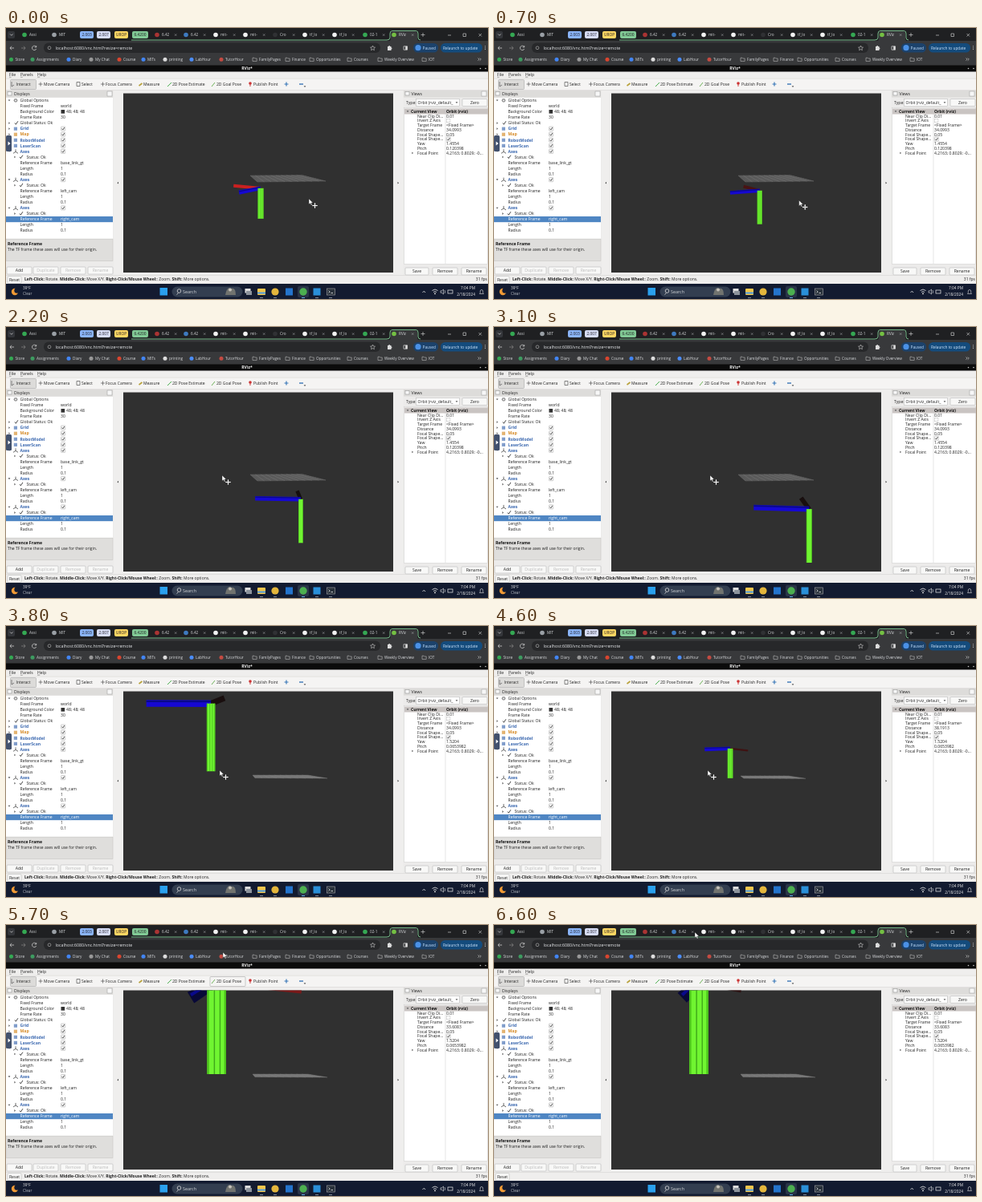
Recreate the animation shown at these times as an HTML page. Size 600x338 px, loop 6700 ms.

```html
<!DOCTYPE html>
<html lang="en">
<head>
<meta charset="utf-8">
<title>RViz axes view</title>
<style>
html, body { margin: 0; width: 100%; height: 100%; overflow: hidden; background: #202124; }
svg { display: block; width: 100vw; height: 100vh; }
text { font-family: "Open Sans", "Noto Sans", sans-serif; white-space: pre; }
</style>
</head>
<body>
<svg id="stage" viewBox="0 0 600 338" preserveAspectRatio="none"></svg>
<script>
const LOOP = 6700, STEP = 100;
const stage = document.getElementById('stage');

// Markup helpers
const rect = (x, y, w, h, fill, extra = '') => `<rect x="${x}" y="${y}" width="${w}" height="${h}" fill="${fill}" ${extra}/>`;
const disc = (x, y, r, fill) => `<circle cx="${x}" cy="${y}" r="${r}" fill="${fill}"/>`;
const path = (d, stroke, width = 0.7, fill = 'none') => `<path d="${d}" stroke="${stroke}" stroke-width="${width}" fill="${fill}"/>`;
const label = (x, y, s, fill = '#222', size = 5.1, extra = '') => `<text x="${x}" y="${y}" font-size="${size}" fill="${fill}" ${extra}>${s}</text>`;
const BOLD = 'font-weight="700"', MIDDLE = 'text-anchor="middle"', END = 'text-anchor="end"';
const line = (a, b, stroke, width) =>
  `<line x1="${a[0]}" y1="${a[1]}" x2="${b[0]}" y2="${b[1]}" stroke="${stroke}" stroke-width="${width}"/>`;
const check = (x, y) => rect(x, y - 2.6, 5.2, 5.2, '#f4f4f4', 'stroke="#aaa" stroke-width=".5" rx=".6"') +
  path(`M${x + 1} ${y}l1.3 1.4 2-3`, '#333', 0.8);
const button = (x, y, w, s, fill = '#222') =>
  rect(x, y, w, 9, '#f8f8f7', 'stroke="#bbb" stroke-width=".6" rx="1"') + label(x + w / 2, y + 6.4, s, fill, 5.1, MIDDLE);
const arrow = (x, y, open) => path(open ? `M${x - 1.4} ${y - .8}h2.8l-1.4 1.8z` : `M${x - .6} ${y - 1.4}l1.6 1.4-1.6 1.4z`, 'none', 0, '#555');

function browser() {
  let s = rect(0, 0, 600, 17, '#1f2022') + rect(0, 16, 600, 31, '#38393b');
  s += rect(2, 4, 9, 9, '#34363a', 'rx="2"') + path('M5 7.5l1.8 1.8 1.8-1.8', '#ddd');
  s += path('M156 15H474q4 0 4-3V7q0-3.5 3-3.5h29q3 0 3 3.5v5q0 3 3 3', '#81c995', 0.9) +
    path('M476 17q3-1 3-4V7q0-3 3-3h27q3 0 3 3v6q0 3 3 4z', 'none', 0, '#38393b');
  const tabs = [[29, 'Assi', '#34a853'], [66, 'MIT', '#9aa0a6'], [194, '6.42', '#a33'], [230, '6.42', '#3e7ac0'],
    [267, 'mit-', '#f2f2f2'], [304, 'mit-', '#f2f2f2'], [341, 'Cro', '#303134'], [378, 'tf_lo', '#f2f2f2'],
    [415, 'tf_lo', '#f2f2f2'], [453, '02-1', '#35a853'], [489, 'RViz', '#74c043']];
  for (const [x, name, color] of tabs) {
    s += disc(x - 6, 8.5, 2.8, color) + label(x, 10.3, name, '#d8dadd', 4.7);
    if (x > 100) s += path(`M${x + 16} 7.4l2.4 2.4m0-2.4l-2.4 2.4`, '#b5b7ba', 0.5);
  }
  const chips = [[92, 17, '2.003', '#8ab4f8'], [113, 17, '2.007', '#d6dcf5'], [135, 17, 'UROP', '#fdd663'], [157, 20, '6.4200', '#81c995']];
  for (const [x, w, name, color] of chips)
    s += rect(x, 4, w, 9, color, 'rx="2"') + label(x + w / 2, 10.4, name, '#202124', 4.8, MIDDLE);
  s += path('M519 6v5m-2.5-2.5h5M550 9h4M569 7h3.5v3.5H569zM588.5 7l3.5 3.5m0-3.5l-3.5 3.5', '#ddd', 0.6);

  s += path('M10 25H5m2-2.3L5 25l2 2.3', '#ddd') + path('M19 25h5m-2-2.3l2 2.3-2 2.3', '#888') +
    path('M37.5 23.5a2.7 2.7 0 1 0 .2 2.5m0-4v2h-2', '#ddd');
  s += rect(47, 18.5, 419, 12.5, '#27282a', 'rx="6"') + `<circle cx="54" cy="24.8" r="1.9" fill="none" stroke="#aaa" stroke-width=".7"/>`;
  s += label(61.5, 26.6, 'localhost:6080/vnc.html?resize=remote', '#e8eaed', 5.25);
  s += path('M456.5 22l.9 2 2.1.2-1.6 1.4.5 2.1-1.9-1.1-1.9 1.1.5-2.1-1.6-1.4 2.1-.2z', '#ccc', 0.6) +
    path('M475 23h1.2a1 1 0 0 1 2 0h1.3v1.5a1 1 0 0 1 0 2V28H475z', 'none', 0, '#ddd') + path('M495 22.8h4.5v4.4H495z', '#ddd', 0.7) + rect(497.2, 22.8, 2.3, 4.4, '#ddd');
  s += rect(507, 19, 31, 11.5, '#1c426b', 'rx="5.5"') + disc(513, 24.7, 3.6, '#4b91e6') + label(518.5, 26.5, 'Paused', '#c2e0ff', 4.8);
  s += rect(541, 19, 52, 11.5, '#144b7c', 'rx="5.5"') + label(544, 26.5, 'Relaunch to update', '#d2e8ff', 4.75);
  for (const y of [22.8, 24.7, 26.6]) s += disc(596.5, y, 0.5, '#ddd');

  const marks = [[11.5, 'Store', '#34a853'], [38, 'Assignments', '#3d9b60'], [83, 'Diary', '#4285f4'], [111, 'My Chat', '#999'],
    [146, 'Course', '#d9452f'], [176, 'MITs', '#4285f4'], [203, 'printing', '#ddd'], [236, 'LabHour', '#4b8df8'], [273, 'TutorHour', '#c44b42']];
  for (const [x, name, color] of marks) s += disc(x - 5, 39.2, 2.5, color) + label(x, 41, name, '#d8dadd', 4.7);
  for (const [x, name] of [[315, 'FamilyPages'], [356, 'Finance'], [386, 'Opportunities'], [433, 'Courses'], [471, 'Weekly Overview'], [526, 'IOT']])
    s += path(`M${x - 8} 37.2h2l.8.8h2.4v3.4h-5.2z`, '#bbb', 0.6) + label(x, 41, name, '#d8dadd', 4.7);
  s += path('M587.5 37.5l1.6 1.6-1.6 1.6m2.2-3.2l1.6 1.6-1.6 1.6', '#ddd', 0.6);
  return s;
}

function displays() {
  let s = rect(0, 78, 134, 230, '#ecebea') + rect(0, 78, 133, 8.5, '#dddcda') +
    rect(2, 79.5, 5, 4.5, '#f7f7f7', 'stroke="#888" stroke-width=".5"') + label(10, 84, 'Displays') +
    rect(126, 79, 6, 6, '#f7f7f7', 'stroke="#999" stroke-width=".5"');
  s += rect(0, 87, 133, 175.5, '#fff');
  const axes = frame => [[1, 'Axes', true, '#3c69b0'], [2, '✓ Status: Ok'], [2, 'Reference Frame', frame], [2, 'Length', '1'], [2, 'Radius', '0.1']];
  const rows = [[0, 'Global Options'], [2, 'Fixed Frame', 'world'], [2, 'Background Color', '48; 48; 48'], [2, 'Frame Rate', '30'],
    [0, '✓ Global Status: Ok'], [1, 'Grid', true, '#3c69b0'], [1, 'Map', true, '#d58a26'], [1, 'RobotModel', true, '#3c69b0'],
    [1, 'LaserScan', true, '#3c69b0'], ...axes('base_link_gt'), ...axes('left_cam'), ...axes('right_cam')];
  rows.forEach(([level, name, value, color], i) => {
    const y = 90.3 + 7.06 * i, base = y + 1.8, selected = i === 21;
    const ink = selected ? '#fff' : '#222';
    if (selected) s += rect(0, y - 3.6, 133, 7.2, '#4f86c3');
    const ok = name.startsWith('✓ ');
    if (level < 2) s += arrow(4, y, i === 0 || name === 'Axes');
    if (ok) {
      const x = level ? 16 : 10;
      s += path(`M${x + 1} ${y}l1.3 1.7 2.6-4`, '#333', 0.9);
      if (level) s += arrow(11, y, false);
      s += label(level ? 25.5 : 17.5, base, name.slice(2));
    } else if (level === 0) {
      s += disc(12, y, 2.4, '#999') + disc(12, y, 0.9, '#fff') + label(17.5, base, name);
    } else {
      s += label(17.5, base, name, color || ink, 5.1, color ? BOLD : '');
      if (level === 1) s += name === 'Axes' ? path(`M12 ${y - 2.5}v3l-3 2m3-2l3 2`, '#444', 0.8)
        : rect(9.8, y - 2, 4.2, 4.2, color, 'opacity=".65"');
    }
    if (value === true) s += check(68.5, y);
    else if (value) {
      if (i === 2) s += rect(68.5, y - 2.4, 4.6, 4.6, '#303030');
      s += label(i === 2 ? 75 : 68, base, value, ink);
    }
  });
  s += rect(0, 263.5, 133, 27, '#dfdedc', 'stroke="#c4c3c1" stroke-width=".5"') + label(2, 271.3, 'Reference Frame', '#111', 5.1, BOLD) +
    label(2, 277.8, 'The TF frame these axes will use for their origin.', '#222', 5);
  s += button(1, 298, 31, 'Add') + button(34, 298, 31, 'Duplicate', '#bbb') + button(68, 298, 31, 'Remove', '#bbb') + button(102, 298, 31, 'Rename', '#bbb');
  s += rect(0, 134, 7, 20, '#42516d', 'rx="1.5"') + path('M2.5 141.5l3 2.5-3 2.5z', 'none', 0, '#fff');
  return s;
}

function rviz() {
  let s = rect(0, 46.5, 600, 8, '#0b0b0b') + label(300, 52.4, 'RViz*', '#f2f2f2', 5.1, MIDDLE + ' ' + BOLD);
  s += disc(590.5, 50.5, 0.8, '#ccc') + disc(597, 50.5, 0.8, '#ccc');
  s += rect(0, 54.5, 600, 265, '#efeeed') + label(4, 60.4, 'File') + label(18, 60.4, 'Panels') + label(39, 60.4, 'Help');
  s += path('M4 61.2h2.5M18 61.2h2.8M39 61.2h3.3', '#222', 0.4);
  s += rect(0, 63, 600, 14.5, '#f5f4f3') + path('M0 63.2H600M0 77.5H600', '#d0cfcd', 0.5);
  s += rect(5.5, 64.5, 32, 12, '#dcdbd9', 'stroke="#aaa" stroke-width=".6" rx="1"');
  for (const [x, name] of [[12.5, 'Interact'], [47, 'Move Camera'], [94, 'Select'], [124, 'Focus Camera'], [171, 'Measure'],
    [207, '2D Pose Estimate'], [262, '2D Goal Pose'], [308, 'Publish Point']]) s += label(x, 71.8, name, '#222', 5);
  s += path('M7 67v6l3-2M40.5 70h5m-2.5-2.5v5M88 67.5h4v5h-4zM118 70h5m-2.5-2.5v5', '#555', 0.7) +
    path('M165.5 72l4-3', '#b9a23c', 1.6) + path('M201 73l5-5', '#4caf50', 1) + path('M256 73l4-5', '#6fb35a', 1) +
    disc(304, 69, 1.8, '#c33') + path('M304 70v3', '#c33', 0.9) + path('M346.5 70h5m-2.5-2.5v5', '#3b78b8', 1.2) + path('M365 70h5', '#3b78b8', 1.4) + arrow(372, 73, true);
  s += displays();
  s += path('M140 191.8l-1.6 1.4 1.6 1.4zM487.5 191.8l1.6 1.4-1.6 1.4z', 'none', 0, '#444');

  s += rect(494.5, 78, 105.5, 230, '#ecebea') + rect(495, 78, 105, 8.5, '#dddcda') + rect(497, 79.5, 5, 4.5, '#f7f7f7', 'stroke="#888" stroke-width=".5"') +
    label(504.5, 84, 'Views') + rect(592, 79, 6, 6, '#f7f7f7', 'stroke="#999" stroke-width=".5"');
  s += label(498, 95, 'Type:') + rect(510.5, 88.5, 54, 9, '#fff', 'stroke="#bbb" stroke-width=".6"') +
    label(512.5, 95, 'Orbit (rviz_default_', '#222', 5) + arrow(561, 93, true) + button(568, 88.5, 31, 'Zero');
  s += rect(495.5, 99.5, 104, 195, '#fff', 'stroke="#ccc" stroke-width=".5"') + rect(496, 100.5, 104, 7, '#c9c4c2');
  s += arrow(500, 104, true) + label(504, 105.8, 'Current View', '#111', 5, BOLD) + label(548, 105.8, 'Orbit (rviz)', '#111', 5, BOLD);
  s += path('M547 100V294', '#c8c8c8', 0.5);
  const names = ['Near Clip Di...', 'Invert Z Axis', 'Target Frame', 'Distance', 'Focal Shape...', 'Focal Shape...', 'Yaw', 'Pitch', 'Focal Point'];
  const values = ['0.01', '', '&lt;Fixed Frame&gt;', '', '0.05', '', '', '', '4.2163; 0.8029; -0...'];
  names.forEach((name, i) => s += label(512, viewRow(i), name) + label(548, viewRow(i), values[i]));
  s += rect(548.5, viewRow(1) - 4, 4.4, 4.4, '#fff', 'stroke="#bbb" stroke-width=".5"') + check(548.2, viewRow(5) - 1.8) + arrow(506, viewRow(8) - 1.8, false);
  s += button(497, 299, 29, 'Save') + button(531, 299, 31, 'Remove') + button(567, 299, 31, 'Rename');
  s += path('M0 308.5H600', '#d0cfcd', 0.5) + button(2, 309.6, 17, 'Reset') + label(599, 315.3, '31 fps', '#222', 5, END);
  return s;
}
const viewRow = i => 111.6 + 5.77 * i;

function taskbar() {
  let s = rect(0, 319, 600, 19, '#131b30') + disc(11, 329, 4.2, '#f19a35') + disc(13.5, 327.5, 3.2, '#131b30') +
    label(21, 326.3, '39°F', '#eee', 4.7) + label(21, 333, 'Clear', '#b8bcc2', 4.7);
  s += rect(191.5, 324, 9.5, 9.5, '#2aa0ee');
  s += rect(206.5, 322.5, 88, 13, '#333e50', 'rx="6.5"') + path('M214.5 330.5l-2 2', '#ddd', 0.8) +
    `<circle cx="215.5" cy="328" r="2.3" fill="none" stroke="#ddd" stroke-width=".8"/>` + label(220, 330.9, 'Search', '#d4d7da', 5.4);
  s += path('M273 333q2-11 7-8 6-2 6 8z', 'none', 0, '#71736f') + disc(279, 326.5, 2, '#c5c1b9');
  s += rect(297.5, 325, 7, 5.5, '#ddd') + rect(299, 328, 7, 5, '#8c939c');
  s += rect(313, 325, 10, 8, '#f3c64d', 'rx="1"') + rect(313, 329.5, 10, 2, '#4d9be0');
  s += disc(335, 329, 4.6, '#e4b63c') + rect(348, 324.5, 9, 9, '#2474cc') + rect(363, 322, 14, 14, '#2a3448', 'rx="2"') +
    disc(370, 329, 4.7, '#4caf50') + rect(382.5, 324.5, 9, 9, '#2a8fd8') + rect(399.5, 325, 10, 8, '#29313b', 'stroke="#aaa" stroke-width=".6"') +
    path('M401.5 327.5l1.7 1.5-1.7 1.5m3 0h2.5', '#fff', 0.7);
  for (const x of [318, 335, 370, 387, 404]) s += rect(x - 2, 336, 4, 0.9, x === 370 ? '#68b8f5' : '#8c949e');
  s += path('M518.5 330l1.8-1.8 1.8 1.8M530.5 327.5q3.5-3 7 0m-5.5 2q2-1.7 4 0', '#eee', 0.8) + disc(534, 331.3, 0.9, '#eee') +
    path('M541 327.8h1.5l2-1.8v6l-2-1.8H541zM546 327q1.4 2 0 4', '#eee', 0.6) + rect(550, 327, 6, 4, 'none', 'stroke="#eee" stroke-width=".7"');
  s += label(584, 326.3, '7:04 PM', '#eee', 4.8, END) + label(584, 333.5, '2/18/2024', '#eee', 4.8, END) +
    path('M589.5 331.5h5l-.8-1.3v-2a1.7 1.7 0 0 0-3.4 0v2z', '#ddd', 0.6);
  return s;
}

stage.innerHTML = `<defs><clipPath id="view"><rect x="146" y="81.5" width="336" height="223.5"/></clipPath></defs>` +
  browser() + rviz() + rect(146, 81.5, 336, 223.5, '#303030') +
  '<g id="scene" clip-path="url(#view)"></g><g id="panel"></g>' + taskbar() + '<g id="pointer"></g>';
const scene = document.getElementById('scene'), panel = document.getElementById('panel'), pointer = document.getElementById('pointer');

// Motion
const mix = (a, b, k) => a + (b - a) * k;
const mixAll = (a, b, k) => a.map((v, i) => mix(v, b[i], k));
const clamp = v => Math.max(0, Math.min(1, v));
function sample(keys, t) {
  const next = keys.findIndex(k => k[0] > t);
  if (next < 0) return keys[keys.length - 1].slice(1);
  const a = keys[next - 1], b = keys[next];
  return mixAll(a, b, (t - a[0]) / (b[0] - a[0])).slice(1);
}
// time, x, y, depth, gap between cameras, blue tip x/y, red tip x/y
const ROBOT = [
  [0, .08, .18, 5.74, .06, -.71, .14, -.89, -.08],
  [1.3, .67, .28, 4.75, 0, -1.02, 0, -.13, -.16],
  [2.2, .97, .4, 4, 0, -1.04, -.02, -.08, -.19],
  [3.1, 1.17, .51, 3.26, 0, -1.03, -.03, -.15, -.21],
  [4.6, 1.56, .69, 1.8, .05, -.86, .03, .6, .07],
  [5.7, 1.61, .683, 2.39, .105, -.28, .17, .92, .1],
  [6.6, 1.547, .683, 2.39, .105, -.18, .17, .46, .09]];
const CURSOR = [[0, 377, 213], [1.3, 382, 216.5], [1.5, 382, 216.5], [2, 269, 185], [3.3, 269, 185], [3.7, 266, 180],
  [5.3, 266, 180], [5.6, 270, 75], [5.7, 270, 34], [6.2, 250, 9]];
const GRID_START = [304, 184, 368, 183.5, 398, 191, 313, 192];
const GRID_LOW = [307, 186, 375, 186, 400, 190, 310, 189.6];
const GRID_FAR = [307, 187, 366, 187, 388, 190.3, 311, 190];

function drawGrid(q, drag) {
  const at = (u, v) => [0, 1].map(i => mix(mix(q[i], q[2 + i], u), mix(q[6 + i], q[4 + i], u), v));
  let s = `<polygon points="${q}" fill="#777" opacity="${mix(.3, .7, drag)}"/>`;
  for (let i = 0; i <= 10; i++) s += line(at(i / 10, 0), at(i / 10, 1), '#858585', 0.35) + line(at(0, i / 10), at(1, i / 10), '#858585', 0.3);
  return s;
}

// Foreshortened arms point at the viewer, so their tips widen
function drawArm(px, py, tx, ty, scale, thick, fill) {
  const reach = Math.hypot(tx, ty), nx = -ty / reach, ny = tx / reach;
  const base = thick / 2, end = base * (1 + .7 * Math.max(0, .9 - reach));
  const ex = px + tx * scale, ey = py + ty * scale;
  const corner = (x, y, r) => [x + nx * r, y + ny * r];
  return `<polygon points="${[corner(px, py, base), corner(ex, ey, end), corner(ex, ey, -end), corner(px, py, -base)].join(' ')}" fill="${fill}"/>`;
}

function drawAxes(t, drag, distance) {
  const [x, y, z, gap, bx, by, rx, ry] = sample(ROBOT, t);
  const scale = 218 / (z + distance - 34.0993), orbit = 34.1 - z;
  const px = 314 + (x - .065 * orbit * drag) * scale, py = 193 + (y - .055 * orbit * drag) * scale;
  const thick = Math.max(4.6, .1 * scale), width = thick + gap * scale;
  const red = (rx < 0 ? 230 : 120) * rx * rx;
  const arm = line([px, py], [px + rx * scale, py + ry * scale], `rgb(${20 + red},${14 + red * .1},${14 + red * .1})`, thick * (rx > .3 ? .5 : .85));
  const blue = drawArm(px, py, bx, by, scale, thick, Math.abs(bx) < .5 ? '#080838' : '#1608d2') +
    drawArm(px, py - thick * .3, bx, by, scale, thick * .25, '#09098c');
  const left = px - width / 2;
  const stripe = (from, size, fill) => rect(left + width * from, py, width * size, scale, fill);
  let green = stripe(0, 1, '#70f531') + stripe(0, .1, '#4cc31c') + stripe(.9, .1, '#4cc31c');
  if (gap > .02) green += stripe(.35, .06, '#3fa81a') + stripe(.65, .06, '#3fa81a');
  return arm + blue + green;
}

function statusText() {
  const b = s => `<tspan font-weight="700">${s}</tspan>`;
  return label(23, 315.3, `${b('Left-Click:')} Rotate. ${b('Middle-Click:')} Move X/Y. ${b('Right-Click/Mouse Wheel:')}: Zoom. ${b('Shift:')} More options.`, '#222', 5);
}

function render(ms) {
  const t = Math.floor(ms % LOOP / STEP) * STEP / 1000;
  const drag = clamp((t - 3.3) / .4);
  const distance = t < 4 ? 34.0993 : t < 5.2 ? 38.1913 : 33.6083;
  const grid = distance > 38 ? GRID_FAR : mixAll(GRID_START, GRID_LOW, drag);
  scene.innerHTML = drawGrid(grid, drag) + drawAxes(t, drag, distance);

  const value = (row, s) => label(548, viewRow(row), s);
  let s = value(3, distance.toFixed(4)) + value(6, (1.4554 + .065 * drag).toFixed(4)) + value(7, (.1203982 - .055 * drag).toPrecision(6));
  if (t < 5.8) s += statusText();
  if (t >= 5.6 && t < 5.8) s += rect(254, 64.5, 44, 12, 'none', 'stroke="#b5b5b5" stroke-width=".7" rx="1"');
  panel.innerHTML = s;

  const [cx, cy] = sample(CURSOR, t);
  const inView = cy > 81;
  pointer.innerHTML = `<g transform="translate(${cx} ${cy})">` +
    path('M0 0v7l1.7-1.5 1.2 2.6 1.2-.6-1.2-2.4h2.2z', '#222', 0.4, '#fff') +
    (inView ? path('M4.5 8.5h6m-3-3v6', '#fff', 1) + path('M6.5 6.5l1-1.3 1 1.3zM6.5 10.5l1 1.3 1-1.3zM5.5 7.5l-1.3 1 1.3 1zM9.5 7.5l1.3 1-1.3 1z', 'none', 0, '#fff') : '') + '</g>';
}

const start = performance.now();
function tick() {
  render(performance.now() - start);
  requestAnimationFrame(tick);
}
tick();
</script>
</body>
</html>
```
